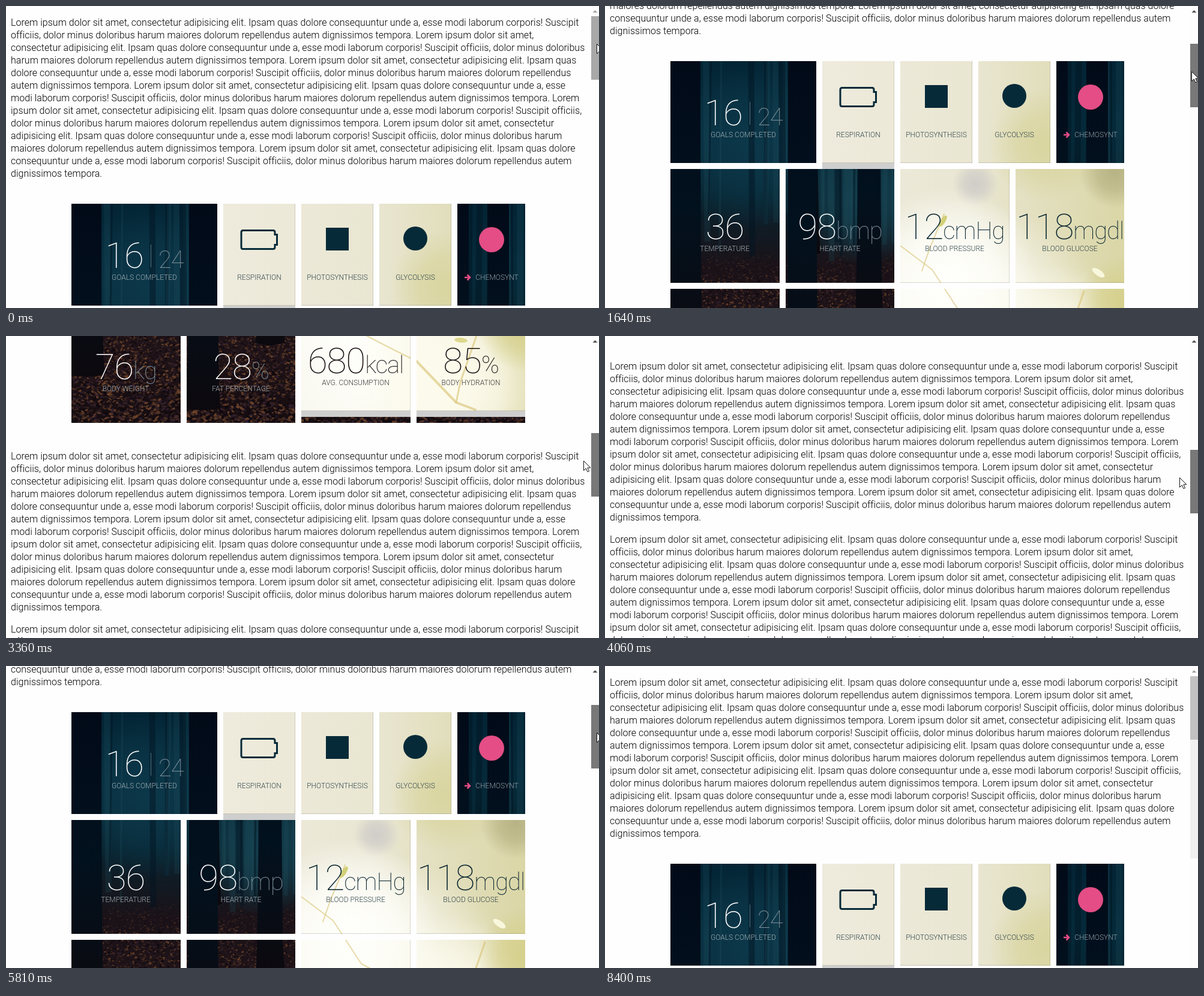
Write an HTML page with a canvas that moves like this. It is 988 by 504 pixels and loops after 8.53 s.

```html
<!DOCTYPE html>
<html lang="en">
<head>
<meta charset="utf-8">
<title>Scrolling dashboard</title>
<style>
  html, body { margin: 0; width: 100%; height: 100%; overflow: hidden; background: #fefefe; }
  body { position: relative; font-family: Roboto, sans-serif; font-weight: 300; }
  #page, #page > *, #bar { position: absolute; left: 0; top: 0; }
  #page { width: 988px; height: 1600px; will-change: transform; }
  #page > p { left: 8px; width: 962px; margin: 0; font-size: 16px; line-height: 21px; letter-spacing: .027px; white-space: pre-line; color: #000; }
  #page > canvas { left: 109px; top: 330px; }
  svg text { font-size: 12px; text-anchor: middle; }
  svg .num { font-size: 60px; font-weight: 100; letter-spacing: -1px; }
  svg .unit { font-size: 40px; }
</style>
</head>
<body>
<div id="page">
  <canvas id="photo" width="756" height="570"></canvas>
  <svg id="tiles" width="975" height="920"></svg>
</div>
<svg id="bar" width="988" height="504">
  <rect x="975" width="13" height="504" fill="#fdfdfd"/>
  <rect id="track" x="975" y="123" width="13" height="0" fill="#f1f1f1"/>
  <path id="up" d="M977.5 11l4-4 4 4z"/>
  <rect id="thumb" x="975" width="13" height="106"/>
  <path id="cursor" d="M.5.5v16l3.8-3.6 2.6 5.8 2.6-1.1-2.6-5.7h5z" fill="#fff" stroke="#111"/>
</svg>
<script>
const $ = id => document.getElementById(id);

// Paragraphs: one passage repeated
const sentence = 'Lorem ipsum dolor sit amet, consectetur adipisicing elit. Ipsam quas dolore consequuntur unde a, esse modi laborum corporis! Suscipit officiis, dolor minus doloribus harum maiores dolorum repellendus autem dignissimos tempora. ';
const [opening, ...rest] = sentence.repeat(7).split(/(?<=tempora\. Lorem ipsum dolor sit amet,) /);
const passage = opening + '\n' + rest.join(' ');
for (const top of [17, 945, 1234]) {
  const p = document.createElement('p');
  p.textContent = passage;
  p.style.top = top + 'px';
  $('page').append(p);
}

// Tile grid, in page coordinates
const LEFT = 109, TOP = 330, GAP = 10;
const small = [0, 1, 2, 3].map(i => 362 + 130 * i);
const column = c => Math.round(LEFT + 191.7 * c);
const darkTiles = [[LEFT, TOP, 243, 170], [small[3], TOP, 120, 170]];
const lightTiles = small.slice(0, 3).map(x => [x, TOP, 120, 170]);
for (const y of [510, 710])
  for (let c = 0; c < 4; c++) {
    const x = column(c), w = column(c + 1) - GAP - x, last = y === 710;
    if (c < 2 || last) darkTiles.push([x, y, w, 190]);
    if (c > 1) lightTiles.push([x, y, w, last ? 170 : 190]);
  }

// Photographs
const ctx = $('photo').getContext('2d');
ctx.translate(-LEFT, -TOP);
let seed = 7;
const rnd = () => (seed = seed * 16807 % 2147483647) / 2147483647;
const between = (a, b) => a + (b - a) * rnd();

function gradient(x0, y0, x1, y1, ...colors) {
  const g = ctx.createLinearGradient(x0, y0, x1, y1);
  colors.forEach((c, i) => g.addColorStop(i / (colors.length - 1), c));
  return g;
}
function box(color, x, y, w, h) {
  ctx.fillStyle = color;
  ctx.fillRect(x, y, w, h);
}
function glow(x, y, r, color) {
  const g = ctx.createRadialGradient(x, y, 0, x, y, r);
  g.addColorStop(0, color);
  g.addColorStop(.5, color + 'b0');
  g.addColorStop(1, color + '00');
  box(g, x - r, y - r, 2 * r, 2 * r);
}
function blob(x, y, rx, ry, angle, color) {
  ctx.fillStyle = color;
  ctx.beginPath();
  ctx.ellipse(x, y, rx, ry, angle, 0, 7);
  ctx.fill();
}
function trunk(x, w, bottom) {
  ctx.fillStyle = gradient(0, TOP, 0, bottom, '#020a18', '#02111e', '#0c090e');
  ctx.beginPath();
  ctx.moveTo(x, TOP);
  ctx.quadraticCurveTo(x, bottom - 12, x - 6, bottom);
  ctx.quadraticCurveTo(x + w / 2, bottom + 8, x + w + 6, bottom);
  ctx.quadraticCurveTo(x + w, bottom - 12, x + w, TOP);
  ctx.fill();
}
function forest() {
  box(gradient(0, TOP, 0, 900, '#032434', '#052a3a', '#08222e', '#1a1218', '#1f1317', '#150c10'), LEFT, TOP, 756, 570);
  glow(240, 470, 140, '#0c384a');
  glow(430, 560, 110, '#15404f');
  for (let i = 0; i < 70; i++) {
    const x = between(150, 865), lean = between(-5, 5), end = between(580, 665);
    ctx.strokeStyle = rnd() < .5 ? 'rgba(2,20,34,.5)' : 'rgba(32,82,98,.22)';
    ctx.lineWidth = between(2, 11);
    ctx.beginPath();
    ctx.moveTo(x, TOP);
    ctx.lineTo(x + lean, end);
    ctx.stroke();
  }
  const leaves = ['#3a2420', '#553524', '#24161c', '#33222e', '#70462c', '#0d080c', '#140d13'];
  for (let i = 0; i < 14000; i++) {
    const y = between(632, 900), near = (y - 632) / 268, s = 1 + near * 2;
    ctx.globalAlpha = Math.min(.85, near * 3);
    blob(between(LEFT, 865), y, s * between(.6, 1.5), s * between(.3, .8), between(-.8, .8), leaves[Math.floor(rnd() * leaves.length)]);
  }
  ctx.globalAlpha = 1;
  trunk(318, 36, 650);
  trunk(421, 38, 766);
  trunk(LEFT, 50, 819);
  trunk(305, 47, 875);
  trunk(small[3], 19, 760);
  trunk(802, 36, 760);
}
function twig(width, ...pts) {
  ctx.lineWidth = width;
  ctx.strokeStyle = '#d9c478a0';
  ctx.beginPath();
  pts.forEach(p => ctx.lineTo(...p));
  ctx.stroke();
}
function meadow() {
  box(gradient(362, 0, 865, 0, '#eeebdd', '#e9e6d2', '#dad6a6'), 362, TOP, 503, 560);
  glow(735, 470, 95, '#d9d5a0');
  glow(617, 535, 38, '#cfcdc8');
  glow(850, 515, 60, '#b7b384');
  glow(570, 690, 150, '#fffffa');
  glow(600, 810, 250, '#fffffb');
  glow(740, 840, 170, '#fdfbec');
  glow(865, 735, 80, '#d6d08c');
  ctx.lineJoin = ctx.lineCap = 'round';
  twig(2, [565, 585], [540, 645], [528, 680]);
  twig(2, [492, 638], [545, 678], [592, 750], [640, 775], [684, 797]);
  twig(4, [684, 797], [750, 866], [782, 878]);
  twig(3, [750, 866], [757, 832], [798, 714]);
  blob(563, 597, 11, 4, -1, '#d2d078');
  blob(822, 683, 12, 5, .6, '#f8f7dc');
  blob(758, 762, 11, 4, .1, '#dcd88c');
}
function paintInside(tiles, paint) {
  ctx.save();
  ctx.beginPath();
  tiles.forEach(t => ctx.rect(...t));
  ctx.clip();
  paint();
  ctx.restore();
}
paintInside(darkTiles, forest);
paintInside(lightTiles, meadow);
lightTiles.forEach(([x, y, w, h], i) => {
  box('rgba(40,40,30,.18)', x, y + h - 1, w, 1);
  box('rgba(40,40,30,.15)', x + w - 1, y, 1, h);
  if (i === 0 || y === 710) box('#cecece', x, y + h, w, GAP);
});

// Captions and icons
const night = ['#fff', '#7d8f9a', '#a3afb4'], day = ['#0a2630', '#0a2630', '#30464a'], pale = ['#1a1214', '#1a1214', '#3a3636'];
const navy = '#062a38', pink = '#e44d85';
const label = (x, y, text, color) => `<text x="${x}" y="${y}" fill="${color}">${text}</text>`;
const stat = (x, y, [num, unit, text], [ink, unitInk, labelInk], gap = 0) =>
  `<text class="num" x="${x}" y="${y}" fill="${ink}">${num}<tspan class="unit" dx="${gap}" fill="${unitInk}">${unit}</tspan></text>` +
  label(x, y + 20, text, labelInk);
const stats = [
  ['36', '', 'TEMPERATURE'], ['98', 'bmp', 'HEART RATE'], ['12', 'cmHg', 'BLOOD PRESSURE'], ['118', 'mgdl', 'BLOOD GLUCOSE'],
  ['76', 'kg', 'BODY WEIGHT'], ['28', '%', 'FAT PERCENTAGE'], ['680', 'kcal', 'AVG. CONSUMPTION'], ['85', '%', 'BODY HYDRATION']
].map((s, i) => {
  const c = i % 4, lower = i > 3, light = c > 1;
  return stat(column(c) + 90.5, (lower ? 827 : 627) - (lower && light ? GAP : 0), s, light ? (lower ? pale : day) : night);
});
const names = ['RESPIRATION', 'PHOTOSYNTHESIS', 'GLYCOLYSIS'].map((n, i) => label(small[i] + 60, 457, n, day[2]));
$('tiles').innerHTML = stats.join('') + names.join('') +
  stat(230.5, 437, ['16', '24', 'GOALS COMPLETED'], night, 25) +
  label(818, 457, 'CHEMOSYNT', '#94a3aa') +
  `<path d="M241.5 398v38" stroke="#566f7c"/>
  <path d="M395 374.5h50q3 0 3 3v4h3.5v17h-3.5v4q0 3-3 3h-50q-3 0-3-3v-25q0-3 3-3z" fill="none" stroke="${navy}" stroke-width="3"/>
  <rect x="533" y="370" width="38" height="38" fill="${navy}"/>
  <circle cx="682" cy="388" r="20" fill="${navy}"/>
  <circle cx="809" cy="390" r="21" fill="${pink}"/>
  <path d="M764 453h8M768.5 448.5l4.5 4.5-4.5 4.5" fill="none" stroke="${pink}" stroke-width="2.6"/>`;

// Smooth curve through points without overshoot
function curve(pts) {
  const slope = pts.slice(1).map(([x, y], i) => (y - pts[i][1]) / (x - pts[i][0]));
  const tangent = pts.map((_, i) => {
    const a = slope[i - 1], b = slope[i];
    return a * b > 0 ? 2 * a * b / (a + b) : 0;
  });
  return x => {
    const i = Math.max(0, pts.findIndex(p => p[0] >= x) - 1);
    const [x0, y0] = pts[i], [x1, y1] = pts[i + 1], w = x1 - x0, u = (x - x0) / w, v = 1 - u;
    return y0 * v * v * (1 + 2 * u) + y1 * u * u * (3 - 2 * u) + w * u * v * (tangent[i] * v - tangent[i + 1] * u);
  };
}
// Scroll offset by drag step: down, turn, back to the top
const scrollAt = curve([[-1, 0], [6, 238], [19, 755], [24, 905], [29, 714], [37, 253], [45, 25], [47, 0]]);
const LOOP = 8530, PRESS = 400, DRAG = 805, STEP = 134.3, STEPS = 47, RELEASE = 7610;

function draw(t) {
  const step = Math.min(STEPS, Math.max(-1, Math.floor((t - DRAG) / STEP)));
  const scroll = Math.round(scrollAt(step)), thumbY = 17 + Math.round(scroll / 5.22);
  const away = Math.min(6, Math.max(0, Math.floor((t - RELEASE) / 131)));
  const held = t >= PRESS && t < RELEASE;
  $('page').style.transform = `translateY(${-scroll}px)`;
  $('thumb').setAttribute('y', thumbY);
  $('thumb').setAttribute('fill', held ? '#787878' : away ? '#c1c1c1' : '#a8a8a8');
  $('up').setAttribute('fill', scroll ? '#505050' : '#a3a3a3');
  $('cursor').setAttribute('transform', `translate(${Math.round(984 + step * .25 - scroll * .036)} ${thumbY + 46})`);
  $('track').setAttribute('height', away * 33);
}
const start = performance.now();
(function tick() {
  draw((performance.now() - start) % LOOP);
  requestAnimationFrame(tick);
})();
</script>
</body>
</html>
```
